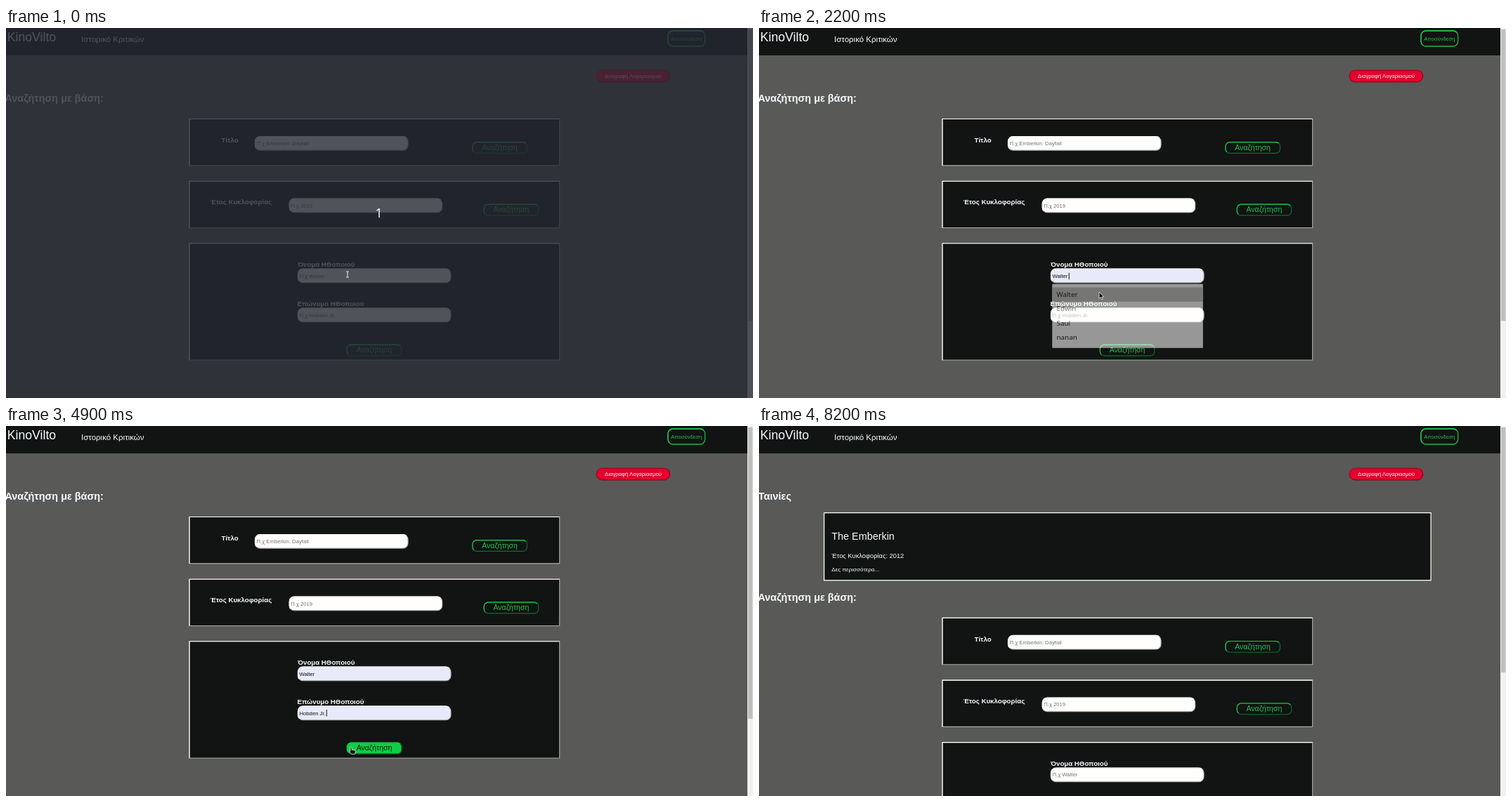
Animation of 1063x527 px, one loop 9300 ms. Source, as an HTML page:

```html
<!DOCTYPE html>
<html lang="el">
<head>
<meta charset="utf-8">
<style>
html, body { margin: 0; width: 100%; height: 100%; overflow: hidden; background: #595957; }
svg { display: block; width: 1063px; height: 527px; font-family: "Liberation Sans", Arial, sans-serif; }
text { white-space: pre; }
.b { font-weight: bold; }
.m { text-anchor: middle; }
.list { font-family: "Noto Sans", sans-serif; font-weight: 500; }
</style>
</head>
<body>
<svg id="stage" viewBox="0 0 1063 527"></svg>
<script>
const LOOP = 9300, INK = '#111412', WHITE = '#fffefd', GREEN = '#27bf52';
const $ = id => document.getElementById(id);

const text = (x, y, size, str, cls = '', fill = '#f6fbff', id = '') =>
  `<text id="${id}" x="${x}" y="${y}" font-size="${size}" class="${cls}" fill="${fill}">${str}</text>`;

const rect = (x, y, w, h, r, attrs) =>
  `<rect x="${x}" y="${y}" width="${w}" height="${h}" rx="${r}" ${attrs}/>`;

// Box with an outset border: dark all round, light along the left and top.
function box(x, y, w, h, r, fill, light, dark, id = '', line = 1.15) {
  const k = r * .293, arc = (px, py) => `A${r} ${r} 0 0 1 ${px} ${py}`;
  const lit = `M${x + k} ${y + h - k}${arc(x, y + h - r)}V${y + r}${arc(x + r, y)}H${x + w - r}${arc(x + w - k, y + k)}`;
  return rect(x, y, w, h, r, `id="${id}" fill="${fill}" stroke="${dark}" stroke-width="${line}"`) +
    `<path d="${lit}" fill="none" stroke="${light}" stroke-width="${line}"/>`;
}

const card = (y, h) => box(261, y, 526.7, h, .1, INK, '#fff', '#a9a9a9');
const field = (x, y, hint, id) =>
  box(x + .5, y + .5, 217.5, 19.6, 7, WHITE, '#fff', '#b4b4b8', id + 'Box') +
  text(x + 2.5, y + 12.9, 7.7, hint, '', '#757575', id + 'Text');
const button = (x, y, id) =>
  box(x + .6, y + .6, 77.6, 15.7, 6, INK, '#22c653', '#0f6e2e', id + 'Box') +
  text(x + 39.3, y + 11.8, 10.5, 'Αναζήτηση', 'm', GREEN, id + 'Text');

const ROW = 20.75;
const list = (id, y, names) => `<g id="${id}" class="list">` +
  rect(415, y, 219, names.length * ROW + 10, 1, `fill="${WHITE}"`) +
  names.map((n, i) => rect(415, y + 5 + i * ROW, 219, ROW, 0, `id="${id}${i}" fill="#c5c5c3"`) +
    text(421.5, y + 19 + i * ROW, 10, n, '', '#1b1b1b')).join('') + '</g>';

$('stage').innerHTML =
  rect(0, 0, 1063, 527, 0, 'fill="#595957"') +
  rect(0, 0, 1055, 39, 0, `fill="${INK}"`) +
  text(1.7, 19.3, 17.7, 'KinoVilto') +
  text(107, 19.6, 11.5, 'Ιστορικό Κριτικών') +
  box(942, 4, 52.7, 22, 7, INK, '#22c653', '#1fb54b', '', 1.3) +
  text(968.2, 17.5, 7.7, 'Αποσύνδεση', 'm', GREEN) +
  box(840.3, 60.2, 104.4, 16.6, 8, '#e2032c', '#c00024', '#8d001b') +
  text(892.5, 71.4, 7.7, 'Διαγραφή Λογαριασμού', 'm') +
  '<g id="results">' +
  text(-1, 105, 14.4, 'Ταινίες', 'b') +
  rect(92.6, 123.6, 863.5, 96.2, 0, `fill="${INK}" stroke="#fff" stroke-width="1.3"`) +
  text(103.3, 162, 14.4, 'The Emberkin') +
  text(103.3, 188.2, 9.3, 'Έτος Κυκλοφορίας: 2012') +
  text(103.3, 207, 8.1, 'Δες περισσότερα...') +
  '</g><g id="search">' +
  text(-1.5, 105, 14.4, 'Αναζήτηση με βάση:', 'b') +
  card(129.5, 66.3) + text(306.5, 162.8, 9.7, 'Τίτλο', 'b') +
  field(354, 154, 'Π.χ Emberkin: Dayfall', 'title') + button(663.3, 162, 'go1') +
  card(218.2, 66.3) + text(290.5, 251.2, 9.7, 'Έτος Κυκλοφορίας', 'b') +
  field(402.7, 242.6, 'Π.χ 2019', 'year') + button(679.6, 250.5, 'go2') +
  card(306.7, 166.3) + text(415, 339.8, 9.7, 'Όνομα ΗΘοποιού', 'b') +
  field(415, 342.6, '', 'first') + text(414.5, 396, 9.7, 'Επώνυμο ΗΘοποιού', 'b') +
  field(415, 398.6, '', 'last') + button(484.7, 450.5, 'go') +
  '</g>' +
  rect(0, 0, 1, 9.5, 0, 'id="caret" fill="#111"') +
  list('names', 363.6, ['Walter', 'Edwin', 'Saul', 'nanan']) +
  list('surnames', 420, ['Hobden JR.', 'Hobden Jr.', 'Pells', 'Marsh', 'cmsjncjns', '']) +
  rect(1055, 0, 8, 527, 0, 'fill="#f1f1f0"') +
  rect(1056, 2, 6.4, 415, 0, 'id="thumb" fill="#bfbfbe"') +
  '<g id="veil">' + rect(0, 0, 1063, 527, 0, 'fill="#262932" opacity=".8"') +
  '<text x="530.7" y="270" font-size="18" class="m" fill="#fff" font-family="Open Sans, sans-serif">1</text></g>' +
  '<g id="cursor">' +
  '<path id="beam" d="M-2 -4H2M0 -4V4M-2 4H2" fill="none" stroke-width="1.1"/>' +
  '<path id="arrow" d="M0 0V9.4L2.2 7.5 3.7 10.8 5.2 10.1 3.8 7H6.7Z" fill="#151515" stroke="#fff" stroke-width=".7"/>' +
  '<path id="hand" d="M-1 .6Q0 -.6 1 .6V4L5.5 5Q6.6 5.3 6.4 6.5L5.6 10.4H.3L-2.6 6.6Q-2.4 5.2 -1 6.2Z" fill="#151515" stroke="#fff" stroke-width=".7"/>' +
  '</g>';

// Pointer path: time, x, y
const PATH = [[0, 486, 351], [900, 486, 351], [1400, 484, 376], [2200, 484, 376], [2700, 488, 408],
  [3100, 488, 408], [4000, 491, 457], [5000, 491, 457], [5400, 506, 466], [5700, 518, 461],
  [7200, 518, 461], [7600, 145, 129], [7700, 145, 129], [8100, 45, 3], [LOOP, 45, 3]];
// Caret visibility: from, until, x, y
const CARETS = [[400, 1000, 417, 348.7], [1400, 1800, 417, 348.7], [2100, 2600, 440.7, 348.7],
  [2800, 3300, 417, 404], [4600, 5400, 455.8, 404], [5900, 6000, 455.8, 404]];

const show = (id, on) => $(id).style.display = on ? '' : 'none';

function pointer(t) {
  const i = PATH.findIndex(p => p[0] > t), [t0, x0, y0] = PATH[i - 1], [t1, x1, y1] = PATH[i];
  const k = (t - t0) / (t1 - t0);
  return [x0 + (x1 - x0) * k, y0 + (y1 - y0) * k];
}

function setField(id, value, hint) {
  $(id + 'Text').textContent = value || hint;
  $(id + 'Text').setAttribute('fill', value ? '#111' : '#757575');
  $(id + 'Box').setAttribute('fill', value ? '#e7ebf9' : WHITE);
}

// Shows a list from open until shortly after pick; returns the hovered row.
function setList(id, t, open, pick, y, top, count, middle) {
  const fading = t >= pick + 100;
  const on = t >= open && t < pick + 200;
  const row = on && y >= top + 5 ? Math.floor((y - top - 5) / ROW) : -1;
  show(id, on);
  $(id).setAttribute('opacity', fading ? .56 : 1);
  $(id).setAttribute('transform', fading ? `translate(524.5 ${middle}) scale(.98) translate(-524.5 ${-middle})` : '');
  for (let i = 0; i < count; i++) show(id + i, i === row);
  return row;
}

function draw(now) {
  const t = Math.floor(now % LOOP / 100) * 100;
  const [x, y] = pointer(t), found = t >= 6300;

  show('veil', t < 100);
  show('results', found);
  $('search').setAttribute('transform', `translate(0 ${found ? 143.9 : 0})`);
  $('thumb').setAttribute('height', found ? 349 : 415);

  const nameRow = setList('names', t, 400, 2100, y, 363.6, 4, 410);
  const lastRow = setList('surnames', t, 2800, 4600, y, 420, 6, 482);
  setField('first', !found && (t >= 2100 || nameRow === 0) && 'Walter', 'Π.χ Walter');
  const surname = t >= 4600 || lastRow === 1 ? 'Hobden Jr.' : lastRow === 0 && 'Hobden JR.';
  setField('last', !found && surname, 'Π.χ Hobden Jr.');

  const hover = t < 4800 || found ? 0 : Math.min(1, (t - 4700) / 200);
  $('goBox').setAttribute('fill', hover ? `rgb(${17 - 2 * hover},${20 + 187 * hover},${18 + 51 * hover})` : INK);
  $('goText').setAttribute('fill', hover ? '#101210' : GREEN);

  const caret = CARETS.find(c => t >= c[0] && t < c[1]);
  show('caret', caret);
  if (caret) $('caret').setAttribute('transform', `translate(${caret[2]} ${caret[3]})`);

  const beam = t < 3600 && (y < 363 || t > 2300 && y > 398 && y < 419);
  const hand = hover > 0;
  show('cursor', t < 8200);
  show('beam', beam);
  show('hand', hand);
  show('arrow', !beam && !hand);
  $('beam').setAttribute('stroke', t < 100 ? '#dcdcdc' : '#4c4c4c');
  $('cursor').setAttribute('transform', `translate(${x} ${y})`);
}

const start = performance.now();
(function tick() {
  draw(performance.now() - start);
  requestAnimationFrame(tick);
})();
</script>
</body>
</html>
```
